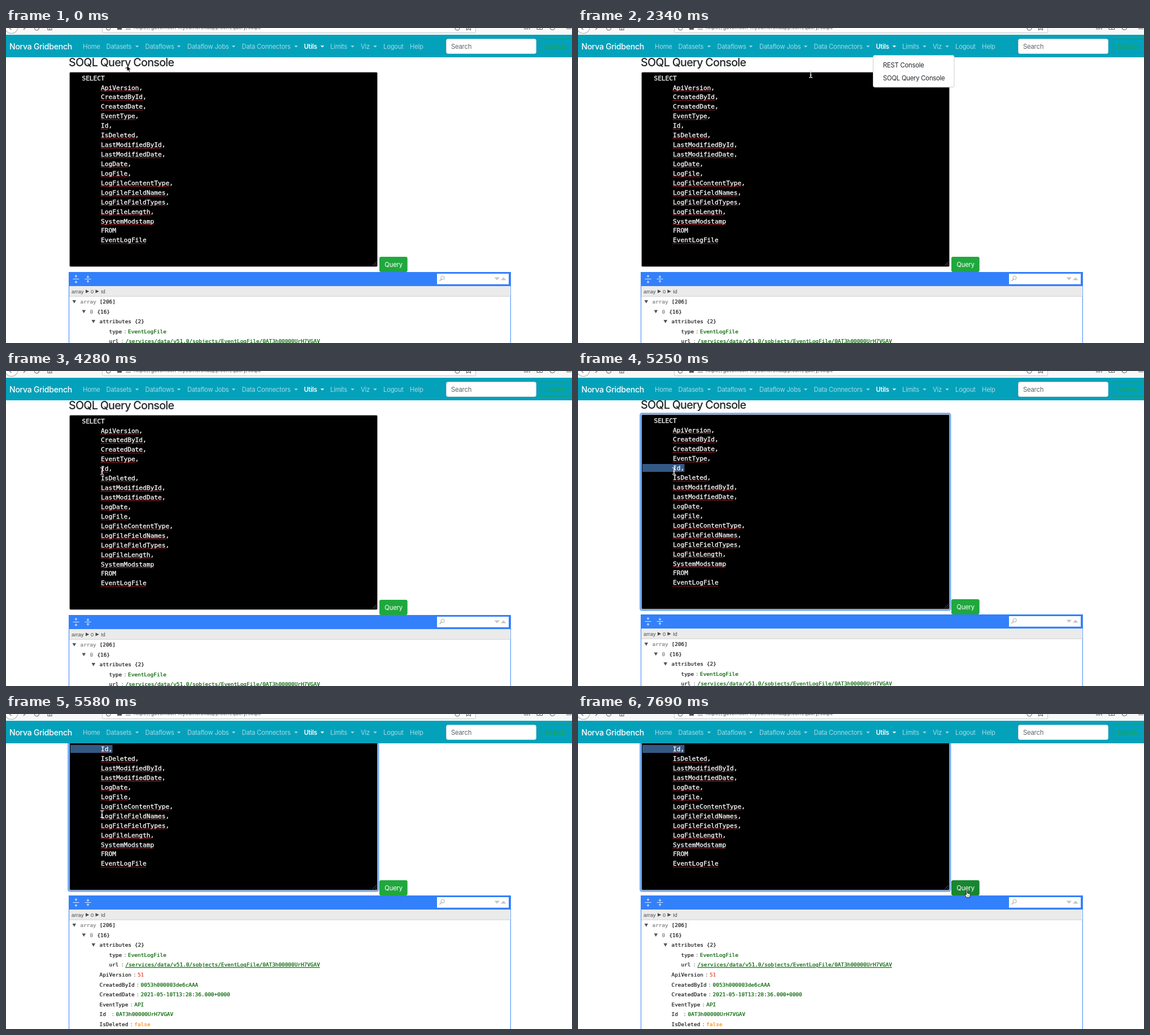
Animation of 1002x559 px, one loop 8000 ms. Source, as an HTML page:

```html
<!DOCTYPE html>
<html lang="en">
<head>
<meta charset="utf-8">
<title>SOQL Query Console</title>
<style>
  html, body { margin: 0; width: 100%; height: 100%; overflow: hidden; background: #fff; }
  svg { display: block; width: 1002px; height: 559px; }
  text { white-space: pre; }
  .ui { font: 11.26px Inter, sans-serif; letter-spacing: -.0187em; }
  .code { font: 11.2px "DejaVu Sans Mono", monospace; fill: #fff; stroke: #fff; stroke-width: .3px; }
  .json { font: 9.38px "DejaVu Sans Mono", monospace; stroke-width: .22px; }
  .path { font: 9.38px "Liberation Sans", Arial, sans-serif; fill: #4d4d4d; }
  .url { font: 9.2px Inter, sans-serif; fill: #555; letter-spacing: -.01em; }
  .title { font: 500 19.7px Inter, sans-serif; letter-spacing: -.037em; fill: #212529; }
  .brand { font: 500 14.07px Inter, sans-serif; letter-spacing: -.018em; fill: #fff; }
  .link { text-decoration: underline; text-decoration-thickness: .7px; }
</style>
</head>
<body>
<svg viewBox="0 0 1002 559">
  <g id="page">
    <text class="title" x="111" y="67.5">SOQL Query Console</text>
    <rect id="ring" x="110.5" y="76.5" width="548.5" height="348.7" rx="3" fill="none" stroke="#79adf0" stroke-width="3"/>
    <rect x="112.5" y="78.5" width="545" height="345" rx="2" stroke="#a8999d"/>
    <path d="M649 422l7-7M653 422l3-3" stroke="#777" stroke-width=".8"/>
    <rect id="mark" x="114" y="166" width="74.5" height="14" fill="#335984"/>
    <g id="query"></g>
    <rect id="button" x="661" y="406" width="49.7" height="27" rx="3"/>
    <text class="ui" x="670.3" y="424" fill="#fff">Query</text>
    <rect x="111.5" y="433.5" width="781.7" height="400" fill="#fff" stroke="#3883fa"/>
    <rect x="111" y="433" width="782.7" height="25.2" fill="#3380fb"/>
    <g fill="none" stroke="#dbe8ff" stroke-width="1.1">
      <path d="M118.5 445.5h11M124 439v4M124 448v4M139.5 445.5h11M145 439v4M145 448v4"/>
      <path d="M122 441l2-2.2 2 2.2M122 450l2 2.2 2-2.2M143 441l2 2.2 2-2.2M143 450l2-2.2 2 2.2"/>
    </g>
    <rect x="763" y="436" width="127" height="18.7" fill="#fff"/>
    <path d="M770.8 445.6l-3.3 3.4" stroke="#b8b8b8" stroke-width="1.6"/>
    <circle cx="773" cy="443.2" r="3" fill="none" stroke="#b8b8b8" stroke-width="1.1"/>
    <path d="M864.5 442.5h9.5l-4.75 5zM876 447.5h9.5l-4.75-5z" fill="#c4c4c4"/>
    <rect x="112" y="458.2" width="781" height="18" fill="#ebebeb"/>
    <path d="M112 476.2h781" stroke="#d3d3d3"/>
    <path d="M141 464.2l6.3 3.2-6.3 3.2zM158.5 464.2l6.3 3.2-6.3 3.2z" fill="#4d4d4d"/>
    <g id="tree"></g>
  </g>
  <g id="nav">
    <rect width="1002" height="12" fill="#f8f8f9"/>
    <rect x="170.5" y="-20" width="661" height="28.5" rx="2" fill="#fff" stroke="#c6c6c8"/>
    <g fill="none" stroke="#666" stroke-width="1.1">
      <circle cx="9.5" cy="-2" r="11.5" fill="#fff" stroke="#aaa"/>
      <path d="M6 0l3.5 3M31 3l4-4M50.5 0a4 4 0 0 0 8 0M74 -2v5.5h7V-2M77.5 0v3"/>
      <path d="M177.5 0a3.7 3.7 0 0 0 7.4 0M795 0a4 4 0 0 0 8 0M815.5 -1v4.5l3.5-2 3.5 2V-1"/>
      <path d="M918 -3v6M920.7 -3v6M923.4 -3v6M925 -3l2.5 6M940 -3v5.5h9.5V-3M945 -3v5M963 -1a4.3 4.3 0 0 0 8.6 0M992 1.5h9"/>
    </g>
    <path d="M197 -3h8v6h-8z" fill="#555"/>
    <path d="M212 -1h9M212 2h9" stroke="#666"/>
    <rect y="12" width="1002" height="40" fill="#04a1bb"/>
    <rect x="779.5" y="19.5" width="159" height="26" rx="3" fill="#fff" stroke="#ced4da"/>
    <rect x="945" y="19.5" width="64" height="26" rx="3" fill="none" stroke="#1fa83d" stroke-width=".7"/>
  </g>
  <g id="menu">
    <rect x="522.5" y="48.5" width="143.5" height="56.5" rx="3" fill="#fff" stroke="#c9cdd0"/>
  </g>
  <g id="arrow">
    <path d="M0 0v10.2l2.4-2.2 1.6 3.8 1.8-.8-1.6-3.6h3.2z" stroke="#fff" stroke-width=".8"/>
  </g>
  <g id="beam" fill="none" stroke="#e8e8e8" stroke-width="1.3">
    <path d="M-3-6q3 0 3 2q0-2 3-2M0-4v8M-3 6q3 0 3-2q0 2 3 2M-1.6 1.5h3.2"/>
  </g>
  <g id="hand">
    <path d="M-1.2 .8q1.2-1.4 2 0V5l3.6.8q1.7.5 1.5 2L5 12.8H-.6L-3.3 8.4q-.4-1.6 1-1.4l1.1 1z" fill="#fff" stroke="#111" stroke-width=".9" stroke-linejoin="round"/>
    <path d="M1.2 9v2.2M3.2 9v2.2" stroke="#333" stroke-width=".7"/>
  </g>
</svg>
<script>
const $ = id => document.getElementById(id);

function add(parent, tag, attrs, content = "") {
  const el = document.createElementNS("http://www.w3.org/2000/svg", tag);
  for (const key in attrs) el.setAttribute(key, attrs[key]);
  el.textContent = content;
  return parent.appendChild(el);
}
const label = (parent, cls, x, y, content, attrs) =>
  add(parent, "text", { class: cls, x, y, ...attrs }, content);

// Navigation bar: label, x, caret centre
const nav = $("nav");
label(nav, "url", 226, 2.3, "https://gavomsen-myed.herokuapp.com/query/soqlc");
label(nav, "brand", 6, 38, "Norva Gridbench");
[["Home", 136], ["Datasets", 177.5, 232], ["Dataflows", 246.5, 306], ["Dataflow Jobs", 321, 403],
 ["Data Connectors", 417.5, 513.5], ["Utils", 527.5, 560], ["Limits", 574, 613.5],
 ["Viz", 628, 653.5], ["Logout", 668], ["Help", 715]].forEach(([name, x, caret]) => {
  const active = name === "Utils";
  const fill = active ? "#fff" : "#a3dbe5";
  label(nav, "ui", x, 37, name, { fill, style: active ? "font-weight:600" : "" });
  if (caret) add(nav, "path", { d: `M${caret - 3.3} 31.2h6.6l-3.3 3.4z`, fill });
});
label(nav, "ui", 788, 37, "Search", { fill: "#5c636a" });
label(nav, "ui", 954, 37, "Search", { fill: "#1fa83d" });

label($("menu"), "ui", 540, 70, "REST Console", { fill: "#212529" });
label($("menu"), "ui", 540, 92.5, "SOQL Query Console", { fill: "#212529" });

// Query text with spelling marks
const fields = ["ApiVersion", "CreatedById", "CreatedDate", "EventType", "Id", "IsDeleted",
  "LastModifiedById", "LastModifiedDate", "LogDate", "LogFile", "LogFileContentType",
  "LogFileFieldNames", "LogFileFieldTypes", "LogFileLength", "SystemModstamp"];
["SELECT", ...fields, "FROM", "EventLogFile"].forEach((word, i) => {
  const y = 92.6 + 16.93 * i;
  const comma = i > 0 && i < fields.length ? "," : "";
  label($("query"), "code", i ? 168 : 134.4, y, word + comma);
  if (word !== "SELECT" && word !== "FROM")
    add($("query"), "path", { d: `M168 ${y + 2.2}h${word.length * 6.742}`,
      stroke: "#e8323a", "stroke-width": 1.4, "stroke-dasharray": "1.4 1.3" });
});

// Result tree
const tree = $("tree"), charW = 5.647, rowY = i => 488.9 + 17.6 * i;
const dark = "#1a1a1a", grey = "#808080", green = "#006000";
const item = (x, y, content, color, cls = "") =>
  label(tree, "json " + cls, x, y, content, { fill: color, stroke: color });

label(tree, "path", 116, 470.7, "array");
label(tree, "path", 150, 470.7, "0");
label(tree, "path", 168, 470.7, "Id");
[["array", "[206]", grey], ["0", "{16}", grey], ["attributes", "{2}", dark]]
  .forEach(([name, size, color], i) => {
    const x = 131.5 + 17 * i, y = rowY(i);
    add(tree, "path", { d: `M${x - 14} ${y - 6}h6.6l-3.3 5.8z`, fill: "#555" });
    item(x, y, name, color);
    item(x + Math.max(name.length * charW, 7) + 5.9, y, size, dark);
  });
[["type", "EventLogFile", green], ["url", "/services/data/v51.0/sobjects/EventLogFile/0AT3h00000UrH7VGAV", green],
 ["ApiVersion", "51", "#ee422e"], ["CreatedById", "0053h000003de6cAAA", green],
 ["CreatedDate", "2021-05-10T13:28:36.000+0000", green], ["EventType", "API", green],
 ["Id", "0AT3h00000UrH7VGAV", green], ["IsDeleted", "false", "#ff8c00"]].forEach(([name, value, color], i) => {
  const x = i < 2 ? 182.5 : 165.5, y = rowY(i + 3);
  const valueX = x + Math.max(name.length * charW, 18) + 11;
  item(x, y, name, dark);
  item(valueX - 8, y, ":", grey);
  item(valueX, y, value, color, name === "url" ? "link" : "");
});

// Pointer moves: start ms, ms per step, steps, x, y
const moves = [
  [120, 100, 7, 546, 32], [1630, 87.5, 5, 560, 93], [2160, 90, 3, 412, 82], [2430, 90, 4, 380, 69],
  [2960, 86, 9, 185, 207], [3920, 90, 5, 170, 177.5], [6060, 95, 7, 94, 283],
  [6990, 90, 3, 620.5, 280.5], [7340, 87.5, 5, 688.5, 313]
];
function pointer(t) {
  let x = 214, y = 66.5;
  for (const [start, step, n, toX, toY] of moves) {
    if (t < start) break;
    const p = Math.min(1, (Math.floor((t - start) / step) + 1) / n);
    const e = p * p * (3 - 2 * p);
    x += (toX - x) * e;
    y += (toY - y) * e;
  }
  return [x, y];
}
const scrollAt = t => t < 5250 ? 0 : t < 5340 ? 1 : t < 5460 ? 41 : t < 5580 ? 91 : 111;
const inside = (x, y, l, t, r, b) => x >= l && x <= r && y >= t && y <= b;
const show = (id, on) => $(id).setAttribute("visibility", on ? "visible" : "hidden");

function draw(now) {
  const t = now % 8000, scroll = scrollAt(t), [x, y] = pointer(t);
  const menuOpen = t >= 1360 && t < 2960;
  const onButton = inside(x, y, 661, 406 - scroll, 711, 433 - scroll);
  const onLink = inside(x, y, 523, 20, 570, 46) || menuOpen && inside(x, y, 522, 48, 667, 106);
  const onText = inside(x, y, 112, Math.max(52, 78 - scroll), 657, 423 - scroll);
  const shape = onButton || onLink ? "hand" : onText ? "beam" : "arrow";

  $("page").setAttribute("transform", `translate(0 ${-scroll})`);
  $("button").setAttribute("fill", onButton ? "#188631" : "#1fa83d");
  show("menu", menuOpen);
  show("ring", t >= 4630);
  $("ring").setAttribute("opacity", t < 4720 ? .6 : 1);
  show("mark", t >= 4900);
  for (const id of ["arrow", "beam", "hand"]) show(id, id === shape);
  $(shape).setAttribute("transform", `translate(${x} ${y})`);
  requestAnimationFrame(draw);
}
requestAnimationFrame(draw);
</script>
</body>
</html>
```
